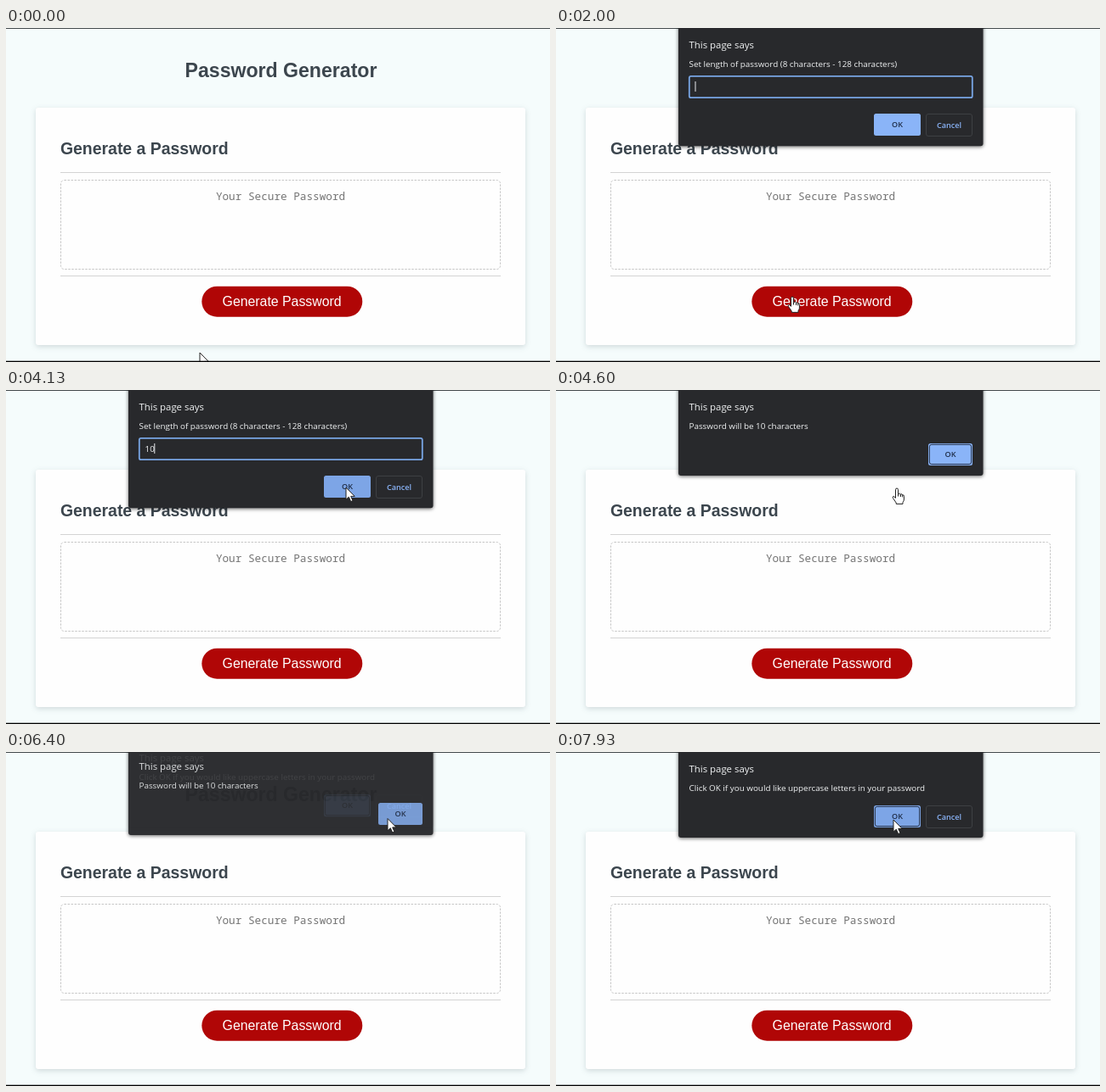
These frames come from a looping animation (640 by 394 pixels, 8 s). An HTML page:

```html
<!DOCTYPE html>
<html lang="en">
<head>
<meta charset="utf-8">
<title>Password Generator</title>
<style>
  html, body { margin: 0; height: 100%; overflow: hidden; background: #f5fcfc; }
  svg { display: block; width: 100vw; height: 100vh; cursor: default; }
  text { font-family: "Open Sans", "Noto Sans", sans-serif; }
  .page { font-family: "Liberation Sans", Arial, sans-serif; fill: #3c464e; font-weight: bold; }
  .hint { font-family: "Noto Sans Mono", monospace; font-size: 12.7px; fill: #757575; }
  .card { fill: #fefefe; filter: drop-shadow(0 2px 3px rgba(40, 60, 70, .18)); }
  .rule { stroke: #d3d3d3; }
  .panel { fill: #28292c; filter: drop-shadow(0 1px 2px rgba(0, 0, 0, .6)); }
  .heading { font-size: 11.4px; fill: #f1f3f4; }
  .message { font-size: 9.85px; fill: #f1f3f4; }
  .label { font-size: 9.1px; font-weight: 600; text-anchor: middle; }
  .focus { fill: none; stroke: #28344a; }
  .pointer { fill: #fff; stroke: #222; stroke-width: 1; stroke-linejoin: round; }
</style>
</head>
<body>
<svg viewBox="0 0 640 394" preserveAspectRatio="none">
  <rect width="640" height="394" fill="#f5fcfc"/>
  <rect width="640" height="1" fill="#444a4c"/>
  <text class="page" x="323.5" y="58" font-size="23.1" text-anchor="middle">Password Generator</text>
  <rect class="card" x="35" y="94" width="576" height="280" rx="3"/>
  <text class="page" x="63.9" y="149.3" font-size="19.45">Generate a Password</text>
  <path class="rule" d="M64 170.5H582M64 292.5H582"/>
  <rect x="64.5" y="179.5" width="517" height="105" rx="4" fill="none" stroke="#c6c6c6" stroke-dasharray="2.5 1.5"/>
  <text class="hint" x="323" y="203" text-anchor="middle">Your Secure Password</text>
  <rect x="230.3" y="304.7" width="189" height="36" rx="18" fill="#b00606"/>
  <text class="page" x="324.6" y="327.8" font-size="15.85" text-anchor="middle" style="fill:#fff;font-weight:400">Generate Password</text>
  <g id="dialogs"></g>
  <g class="pointer">
    <path id="arrow" d="M0 0V14.2L3.3 11.2 5.7 16.6 8 15.6 5.7 10.4H10.2Z"/>
    <path id="hand" d="M-1.5 1.5a1.5 1.5 0 0 1 3 0V6.5q2.7-1 3 .5 2-.8 2.2.8 1.7-.3 1.7 1.5V13q0 2-1.4 3.5V18.4H-.8V17L-4.6 11.5q-.6-2 .8-2.2L-1.5 11.3ZM1.5 6.5v3M4.5 7v3M6.7 8v2.4"/>
  </g>
  <rect y="392.7" width="640" height="1.3"/>
</svg>
<script>
const LOOP = 8000, SLIDE = 180;
const $ = selector => document.querySelector(selector);
const clamp = v => Math.min(1, Math.max(0, v));

function button(x, y, width, label, primary, focused) {
  const box = (inset, attributes) =>
    `<rect x="${x + inset}" y="${y + inset}" width="${width - 2 * inset}" height="${26 - 2 * inset}" rx="2.5" ${attributes}/>`;
  const paint = primary ? 'fill="#8ab4f8" class="ok"' : 'fill="none" stroke="#3d4043"';
  return box(0, paint) + (focused ? box(1.4, 'class="focus"') : '') +
    `<text class="label" x="${x + width / 2}" y="${y + 16.2}" fill="${primary ? '#202f4a' : '#8ab4f8'}">${label}</text>`;
}

function dialog(id, height, message, controls) {
  return `<g id="${id}"><rect class="panel" x="144" y="-30" width="358.5" height="${height + 30}" rx="3"/>
    <text class="heading" x="156.5" y="24">This page says</text>
    <text class="message" x="156.5" y="46.2">${message}</text>${controls}</g>`;
}

$('#dialogs').innerHTML =
  dialog('prompt', 139.3, 'Set length of password (8 characters - 128 characters)',
    `<rect x="156.8" y="56.8" width="333" height="25.4" rx="2" fill="#28292c" stroke="#78a5e4" stroke-width="1.8"/>
     <text id="typed" class="message" x="163.5" y="72.8"></text>
     <rect id="caret" y="63" width="1" height="12" fill="#e8eaed"/>` +
    button(374, 101, 55, 'OK', true) + button(435.5, 101.5, 54, 'Cancel')) +
  dialog('alert', 101, 'Password will be 10 characters', button(438, 63, 52, 'OK', true, true)) +
  dialog('confirm', 101, 'Click OK if you would like uppercase letters in your password',
    button(374, 63, 55, 'OK', true, true) + button(435.5, 63.5, 54, 'Cancel'));

// Dialogs slide down while fading in, and slide back up while fading out.
const dialogTimes = [
  { id: 'prompt', open: 910, close: 4380, hover: 3750 },
  { id: 'alert', open: 4430, close: 6322, hover: 5900 },
  { id: 'confirm', open: 6382, close: Infinity, hover: 7250 },
];

// Pointer stops: time, x, y
const route = [
  [0, 228, 383], [100, 228, 383], [700, 275, 332], [1750, 275, 332],
  [1980, 278, 317], [2950, 278, 317], [3800, 400, 115], [4380, 400, 115],
  [4450, 401, 116], [5250, 401, 116], [6000, 449, 78.5], [6600, 449, 78.5],
  [7300, 397, 80], [LOOP, 397, 80],
];

function pointerAt(t) {
  const next = Math.max(1, route.findIndex(stop => stop[0] > t));
  const [t0, x0, y0] = route[next - 1], [t1, x1, y1] = route[next];
  const p = (t - t0) / (t1 - t0), e = p * p * (3 - 2 * p);
  return [x0 + (x1 - x0) * e, y0 + (y1 - y0) * e];
}

function drawDialog({ id, open, close, hover }, t) {
  const enter = clamp((t - open) / SLIDE), leave = clamp((t - close) / SLIDE);
  const group = $('#' + id);
  const shift = -16 * ((1 - enter) ** 2 + leave ** 2);
  group.setAttribute('transform', `translate(0 ${shift})`);
  group.setAttribute('opacity', clamp(enter * 2.2 - .14) * (1 - leave ** 4));
  group.querySelector('.ok').setAttribute('fill', t > hover ? '#7da5e6' : '#8ab4f8');
  group.querySelector('.focus')?.setAttribute('opacity', t > close ? 0 : 1);
}

function drawField(t) {
  const typed = t < 2500 ? '' : t < 2700 ? '1' : '10';
  const blinkStart = [910, 2500, 2700][typed.length];
  $('#typed').textContent = typed;
  $('#caret').setAttribute('x', 163.5 + typed.length * 5.4);
  $('#caret').setAttribute('opacity', (t - blinkStart) % 1060 < 530 ? 1 : 0);
}

function drawPointer(t) {
  const [x, y] = pointerAt(t);
  const overButton = x > 230 && x < 419 && y > 305 && y < 341;
  const isHand = overButton || (t > 4440 && t < 5250);
  for (const [id, shown] of [['#hand', isHand], ['#arrow', !isHand]]) {
    $(id).setAttribute('transform', `translate(${x} ${y})`);
    $(id).setAttribute('visibility', shown ? 'visible' : 'hidden');
  }
}

const start = performance.now();
function frame() {
  const t = (performance.now() - start) % LOOP;
  dialogTimes.forEach(d => drawDialog(d, t));
  drawField(t);
  drawPointer(t);
  requestAnimationFrame(frame);
}
frame();
</script>
</body>
</html>
```
